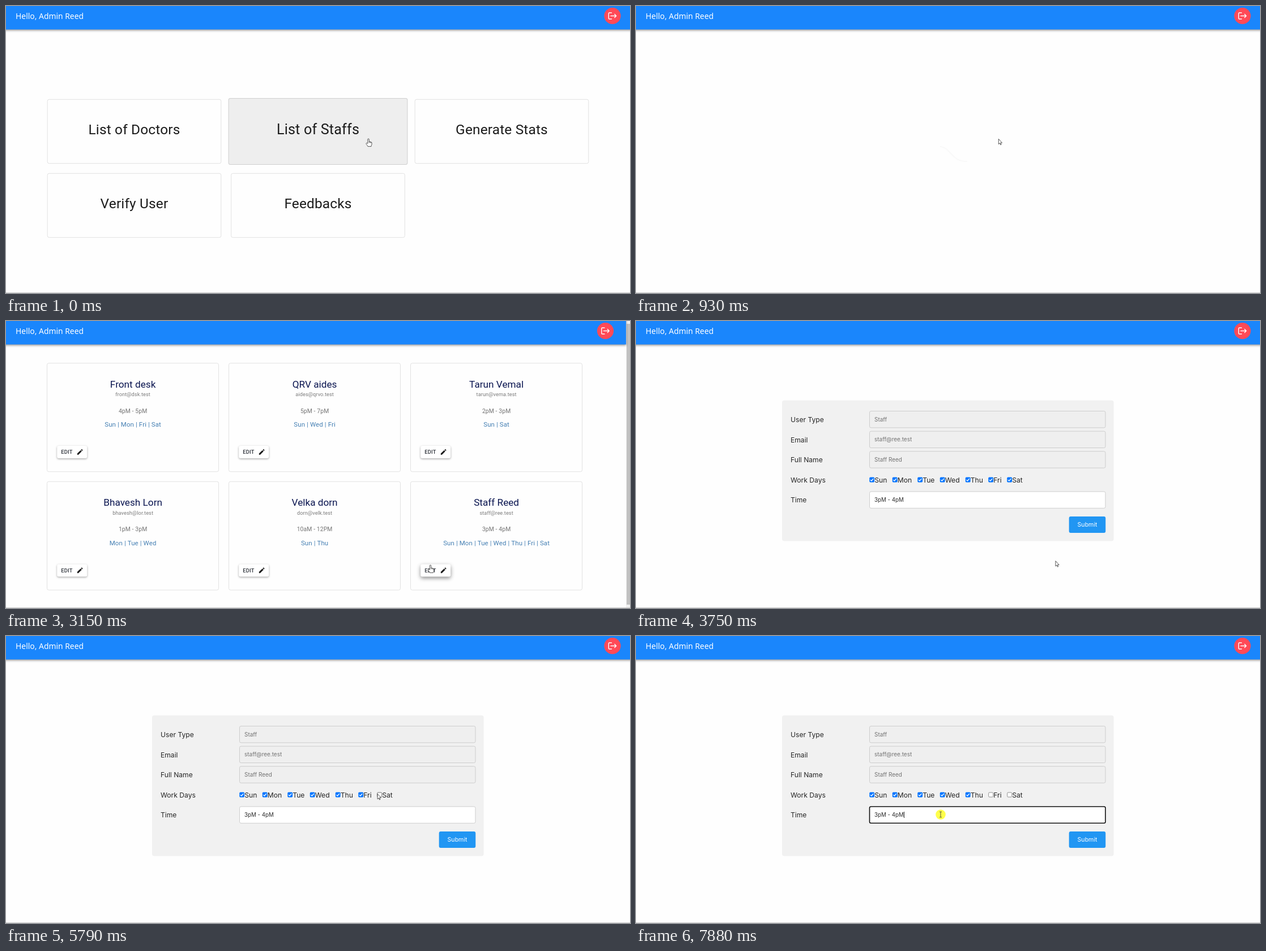
Animation, 1102 px wide and 508 px high, one loop 8000 ms. Source, as an HTML page with a canvas:

```html
<!DOCTYPE html>
<html lang="en">
<head>
<meta charset="utf-8">
<title>Staff admin</title>
<style>
  html, body { margin: 0; width: 100%; height: 100%; overflow: hidden; background: #fefefe; }
  canvas { display: block; }
</style>
</head>
<body>
<canvas id="stage" width="1102" height="508"></canvas>
<script>
const ctx = document.getElementById('stage').getContext('2d');
const LOOP = 8000, STEP = 70;
const ROBOTO = 'Roboto, sans-serif', INTER = 'Inter, sans-serif', NOTO = '"Noto Sans", sans-serif';

const tiles = ['List of Doctors', 'List of Staffs', 'Generate Stats', 'Verify User', 'Feedbacks'];
const staff = [
  ['Front desk', 'front@dsk.test', '4pM - 5pM', 'Sun | Mon | Fri | Sat'],
  ['QRV aides', 'aides@qrvo.test', '5pM - 7pM', 'Sun | Wed | Fri'],
  ['Tarun Vemal', 'tarun@vema.test', '2pM - 3pM', 'Sun | Sat'],
  ['Bhavesh Lorn', 'bhavesh@lor.test', '1pM - 3pM', 'Mon | Tue | Wed'],
  ['Velka dorn', 'dorn@velk.test', '10aM - 12PM', 'Sun | Thu'],
  ['Staff Reed', 'staff@ree.test', '3pM - 4pM', 'Sun | Mon | Tue | Wed | Thu | Fri | Sat']
];
const days = [['Sun', 412], ['Mon', 452.5], ['Tue', 497], ['Wed', 536.5], ['Thu', 581.5], ['Fri', 622], ['Sat', 655]];

// Pointer moves: start time, number of steps, end position
const moves = [
  [1780, 1, 653, 249], [2090, 11, 749.5, 432], [3750, 4, 608, 311], [4220, 7, 665, 279],
  [4990, 2, 659, 279], [5710, 7, 624.5, 280], [6790, 10, 538, 316]
];
const clicks = [[590, 720], [3010, 3150], [5450, 5590], [6460, 6590], [7880, 8000]];

const pencil = new Path2D('M3 17.25V21h3.75L17.81 9.94l-3.75-3.75L3 17.25zM20.71 7.04c.39-.39.39-1.02 0-1.41l-2.34-2.34c-.39-.39-1.02-.39-1.41 0l-1.83 1.83 3.75 3.75 1.83-1.83z');
const arrow = new Path2D('M.3 .3V9.6L2.4 7.7 3.8 10.8 5.1 10.2 3.7 7.2H6.5Z');
const hand = new Path2D('M-1.2 8V1Q-1.2 0 0 0Q1.2 0 1.2 1V5Q2.3 4.4 3 5.4Q4.2 4.9 4.6 6Q6 5.8 6 7.2V9.5Q6 11 5 12.4V13.6H-1Q-2 11.5 -3.8 9.3Q-4.4 8 -3.3 7.4Q-2.2 7.1 -1.2 8.6Z');

const ease = p => p < 0.5 ? 4 * p ** 3 : 1 - (2 - 2 * p) ** 3 / 2;
const inside = (p, x, y, w, h) => p.x >= x && p.x <= x + w && p.y >= y && p.y <= y + h;

function pointerAt(t) {
  let x = 640, y = 235;
  for (const [start, n, tx, ty] of moves) {
    if (t < start) break;
    const k = ease(Math.min(n, Math.floor((t - start) / STEP) + 1) / n);
    x += (tx - x) * k;
    y += (ty - y) * k;
  }
  return { x, y };
}

function text(str, x, y, size, color, { font = ROBOTO, weight = 400, align = 'left', spacing = 0 } = {}) {
  ctx.font = `${weight} ${size}px ${font}`;
  ctx.letterSpacing = spacing + 'px';
  ctx.textAlign = align;
  ctx.fillStyle = color;
  ctx.fillText(str, x, y);
}

function box(x, y, w, h, r, fill, stroke, line = 1) {
  ctx.beginPath();
  ctx.roundRect(x, y, w, h, r);
  if (fill) { ctx.fillStyle = fill; ctx.fill(); }
  if (stroke) { ctx.strokeStyle = stroke; ctx.lineWidth = line; ctx.stroke(); }
}

function withShadow(alpha, blur, dy, draw) {
  ctx.save();
  ctx.shadowColor = `rgba(0,0,0,${alpha})`;
  ctx.shadowBlur = blur;
  ctx.shadowOffsetY = dy;
  draw();
  ctx.restore();
}

function header(scrollable) {
  const w = scrollable ? 1095 : 1102, cx = scrollable ? 1058.5 : 1071;
  withShadow(0.45, 4, 1.5, () => {
    ctx.fillStyle = '#1a86fc';
    ctx.fillRect(-10, -10, w + (scrollable ? 10 : 20), 51.5);
  });
  text('Hello, Admin Reed', 17, 22.5, 13.9, '#fff', { font: NOTO });
  ctx.fillStyle = '#ff4a57';
  ctx.beginPath();
  ctx.arc(cx, 17.5, 14.6, 0, 7);
  ctx.fill();
  ctx.save();
  ctx.translate(cx, 17.5);
  ctx.strokeStyle = '#fff';
  ctx.lineWidth = 1.4;
  ctx.lineJoin = ctx.lineCap = 'round';
  ctx.stroke(new Path2D('M-1.5 -5.5H-5.5Q-6.7 -5.5 -6.7 -4.3V4.3Q-6.7 5.5 -5.5 5.5H-1.5M-3 0H6.6M3.8 -2.9L6.7 0 3.8 2.9'));
  ctx.restore();
}

function home() {
  tiles.forEach((name, i) => {
    const cx = 226.5 + (i % 3) * 324.5, cy = 222 + Math.floor(i / 3) * 131;
    const hover = i === 1, s = hover ? 1.03 : 1;
    ctx.save();
    ctx.translate(cx, cy);
    ctx.scale(s, s);
    box(-153.3, -56.7, 306.6, 113.4, 3, hover ? '#eee' : '#fefefe', hover ? '#cfcfcf' : '#e2e2e2');
    text(name, 0, 4.8, 24.4, '#1c1c1c', { align: 'center', spacing: 0.18 });
    ctx.restore();
  });
}

function editButton(x, y, hover) {
  withShadow(hover ? 0.45 : 0.36, hover ? 7 : 3.5, hover ? 2.8 : 1.3, () => box(x, y, 53, 22, 3, '#fff'));
  text('EDIT', x + 7, y + 14.2, 9.32, '#30343c', { weight: 500, spacing: 0.27 });
  ctx.save();
  ctx.translate(x + 34, y + 4.3);
  ctx.scale(0.54, 0.54);
  ctx.fillStyle = '#1b1b1b';
  ctx.fill(pencil);
  ctx.restore();
}

function list(p) {
  staff.forEach(([name, mail, hours, week], i) => {
    const x = 72.5 + (i % 3) * 321, y = 74.7 + Math.floor(i / 3) * 209.5, cx = x + 151.6;
    const align = 'center';
    box(x, y, 303, 192, 3, '#fefefe', '#e2e2e2');
    text(name, cx, y + 42.8, 17.2, '#0a1550', { align });
    text(mail, cx, y + 58.3, 9.18, '#7b7b7b', { align, spacing: 0.086 });
    text(hours, cx, y + 88, 10.4, '#747474', { align, spacing: 0.1 });
    text(week, cx, y + 112.3, 11.47, '#447fb3', { align, spacing: 0.108 });
    editButton(x + 17.7, y + 146.3, inside(p, x + 17, y + 146, 54, 23));
  });
  ctx.fillStyle = '#f1f1f1';
  ctx.fillRect(1095, 0, 7, 507);
  ctx.fillStyle = '#c1c1c1';
  ctx.fillRect(1096, 5, 6, 497);
}

function checkbox(x, on, hover) {
  const y = 276.6;
  if (on) {
    box(x + 0.3, y, 8.8, 8.8, 1.6, hover ? '#005cc8' : '#0075ff');
    ctx.strokeStyle = '#fff';
    ctx.lineWidth = 1.4;
    ctx.lineCap = 'butt';
    ctx.beginPath();
    ctx.moveTo(x + 2, y + 4.6);
    ctx.lineTo(x + 3.9, y + 6.4);
    ctx.lineTo(x + 7.4, y + 2.3);
    ctx.stroke();
  } else {
    box(x + 0.7, y + 0.4, 8, 8, 1.5, '#fff', hover ? '#4f4f4f' : '#767676', 0.8);
  }
}

function form(t, p) {
  const font = INTER, focused = t >= 7880;
  box(258, 140.5, 585.7, 249, 4, '#f1f1f1');
  ['User Type', 'Email', 'Full Name', 'Work Days', 'Time'].forEach((label, i) =>
    text(label, 273, 179 + i * 35.6, 12.1, '#262626', { font }));
  ['Staff', 'staff@ree.test', 'Staff Reed'].forEach((value, i) => {
    const y = 159.5 + i * 35.6;
    box(412.5, y, 416.5, 29.4, 2.5, '#efefef', '#cdcdcd');
    text(value, 421, y + 18.3, 9.95, '#727272', { font });
  });
  days.forEach(([day, x], i) => {
    const on = !(i === 6 && t >= 5450 || i === 5 && t >= 6460);
    checkbox(x, on, inside(p, x, 275, i === 6 ? 28 : 24, 13));
    text(day, x + 9.2, 286, 12.2, '#262626', { font });
  });
  box(412.5, 302, 416.5, 29.3, 2.5, '#fff', focused ? '#101010' : '#cdcdcd', focused ? 1.6 : 1);
  text('3pM - 4pM', 421, 320.2, 9.75, '#2b2b2b', { font });
  if (focused) {
    ctx.fillStyle = '#111';
    ctx.fillRect(473, 311, 0.9, 11);
  }
  box(764.7, 346, 64.6, 29, 3, '#2196f3');
  text('Submit', 797, 364, 10.6, '#fff', { font, align: 'center' });
}

function pointer(p, kind, clicked) {
  ctx.save();
  ctx.translate(p.x, p.y);
  if (clicked) {
    ctx.globalCompositeOperation = 'multiply';
    ctx.fillStyle = '#ffff4a';
    ctx.beginPath();
    ctx.arc(0, 0, 8.8, 0, 7);
    ctx.fill();
    ctx.globalCompositeOperation = 'source-over';
  }
  ctx.lineWidth = 0.85;
  ctx.lineJoin = 'round';
  ctx.strokeStyle = '#3a3a3a';
  if (kind === 'beam') {
    ctx.stroke(new Path2D('M-2 -4.8H-.5Q0 -4.8 0 -4.3V4.3Q0 4.8 -.5 4.8H-2M2 -4.8H.5Q0 -4.8 0 -4.3M0 4.3Q0 4.8 .5 4.8H2'));
  } else {
    const shape = kind === 'hand' ? hand : arrow;
    ctx.fillStyle = '#fff';
    ctx.fill(shape);
    ctx.stroke(shape);
    if (kind === 'hand') ctx.stroke(new Path2D('M1.2 5V7.2M3 5.5V7.4M4.6 6V7.6'));
  }
  ctx.restore();
}

function draw(t) {
  const p = pointerAt(t);
  const page = t < 790 ? 'home' : t < 1000 ? 'blank' : t < 3220 ? 'list' : 'form';
  let kind = 'arrow';
  ctx.fillStyle = '#fefefe';
  ctx.fillRect(0, 0, 1102, 508);
  if (page === 'home') {
    home();
    kind = 'hand';
  } else if (page === 'blank') {
    // Barely visible loading arc
    ctx.strokeStyle = '#f9f9f9';
    ctx.lineWidth = 2;
    ctx.beginPath();
    ctx.moveTo(537, 249);
    ctx.bezierCurveTo(555, 249, 558, 277, 585, 275);
    ctx.stroke();
  } else if (page === 'list') {
    list(p);
    if (inside(p, 732, 430.5, 53, 23)) kind = 'hand';
  } else {
    form(t, p);
    if (inside(p, 412, 301, 417, 31)) kind = 'beam';
  }
  header(page === 'list');
  ctx.fillStyle = '#cacaca';
  ctx.fillRect(0, 507, 1102, 1);
  pointer(p, kind, clicks.some(([a, b]) => t >= a && t < b));
}

const begin = performance.now();
function frame() {
  draw((performance.now() - begin) % LOOP);
  requestAnimationFrame(frame);
}
frame();
</script>
</body>
</html>
```
